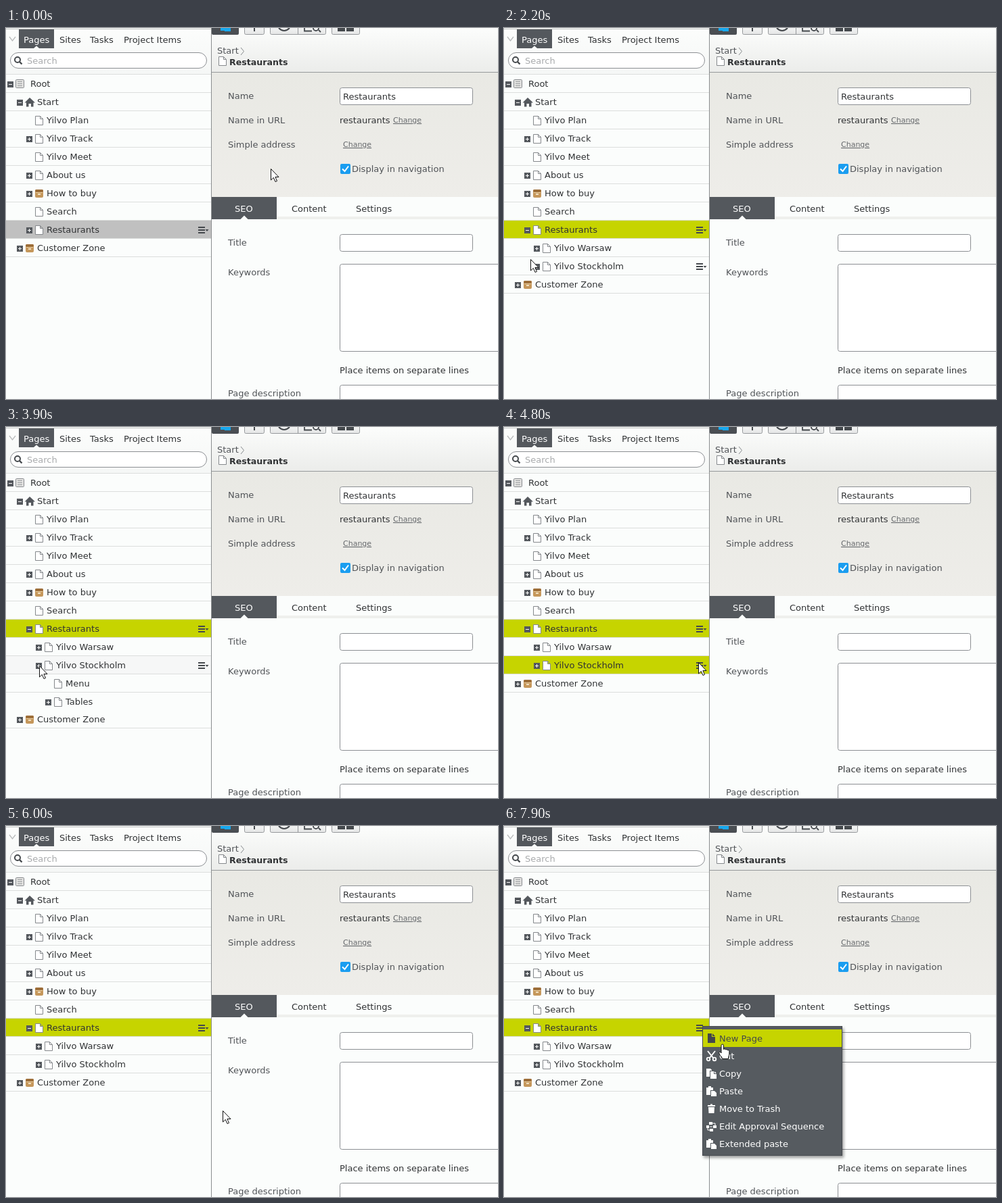
An HTML page that plays this animation: 727x549 px, repeating every 8000 ms.

```html
<!DOCTYPE html>
<html lang="en">
<head>
<meta charset="utf-8">
<title>Page tree</title>
<style>
  html, body { margin: 0; width: 100%; height: 100%; overflow: hidden; background: #fbfdfc; }
  svg { display: block; width: 100vw; height: 100vh; }
  text { font: 13px "DejaVu Sans", Verdana, sans-serif; fill: #303234; white-space: pre; }
  .label { fill: #505357; }
  .link { font-size: 11px; fill: #66696c; text-decoration: underline; }
  .bold { font-size: 12.6px; font-weight: bold; }
  .light { fill: #fff; }
  .hint { fill: #a9abad; }
  .field { fill: #fff; stroke: #8c8f93; }
  .item { color: #fff; }
  .item text { fill: currentColor; }
  .item.off { color: #7c8085; }
  .item.on { color: #43474b; }
  .item .hit { fill: none; }
  .item.on .hit { fill: #c6d400; }
</style>
</head>
<body>
<svg id="stage" viewBox="0 0 727 549" preserveAspectRatio="none"></svg>
<script>
const DARK = '#54585d', LIME = '#c6d400', PAPER = '#fbfdfc';
const ROW = 27, TREE_TOP = 69, CHILD_TOP = 312, LOOP = 8000, TICK = 100;

const rect = (x, y, w, h, fill, extra = '') =>
  `<rect x="${x}" y="${y}" width="${w}" height="${h}" fill="${fill}" ${extra}/>`;
const field = (x, y, w, h, r = 3) =>
  `<rect class="field" x="${x + .5}" y="${y + .5}" width="${w - 1}" height="${h - 1}" rx="${r}"/>`;
const text = (x, y, str, cls = '') => `<text x="${x}" y="${y}" class="${cls}">${str}</text>`;
const path = (d, fill = 'none', stroke = 'none', width = 1, extra = '') =>
  `<path d="${d}" fill="${fill}" stroke="${stroke}" stroke-width="${width}" ${extra}/>`;
const at = (x, y, body, attrs = '') => `<g transform="translate(${x} ${y})" ${attrs}>${body}</g>`;
const gradient = (id, from, to) =>
  `<linearGradient id="${id}" x2="0" y2="1"><stop stop-color="${from}"/><stop offset="1" stop-color="${to}"/></linearGradient>`;

// Tree icons, drawn in a box of about 13 by 14
const treeIcons = {
  page: path('M.5.5H7.5L11.5 4.5V13.5H.5ZM7.5.5V4.5H11.5', '#fff', '#85888c'),
  box: rect(0, 1, 12, 12, '#c5975b', 'rx="2"') + rect(0, 1, 12, 4, '#9c6d38', 'rx="2"') +
       rect(1, 5, 10, 1, '#ecd2a4') + rect(4, 7, 4, 2, '#f1dfc0'),
  home: path('M6 0L-1.5 7.5H1V13.5H4.5V9H8V13.5H11.5V7.5H14Z', DARK),
  root: rect(-.5, .5, 12, 12, '#e4e4e2', 'rx="1" stroke="#85888c"') +
        path('M2 3.5H9M2 6.5H9M2 9.5H9', 'none', '#96999c')
};
const expander = (x, y, id = '') =>
  rect(x, y, 9, 9, DARK) + path(`M${x + 2} ${y + 4.5}h5`, 'none', '#fff') +
  path(`M${x + 4.5} ${y + 2}v5`, 'none', '#fff', 1, id && `id="${id}"`);

// sign: '' none, '+' closed, '-' open, otherwise the id of a switchable plus stroke
function treeRow(y, depth, label, icon = 'page', sign = '', backId = '') {
  const x = 2 + 14 * depth;
  let out = backId ? rect(0, y, 303, ROW - 1, 'none', `id="${backId}"`) : '';
  out += rect(0, y + ROW - 1, 303, 1, '#dcdedd');
  if (sign === '-') out += rect(x, y + 10, 9, 9, DARK) + path(`M${x + 2} ${y + 14.5}h5`, 'none', '#fff');
  else if (sign) out += expander(x, y + 10, sign === '+' ? '' : sign);
  return out + at(x + 13, y + 7, treeIcons[icon]) + text(x + (depth ? 30 : 34), y + 18, label);
}
const rowMenu = (y, id) => at(284, y + 9,
  path('M0 1H10M0 5H10M0 9H10', 'none', '#45494d', 2) + path('M10.5 4H15.5L13 7Z', '#45494d'), `id="${id}"`);

const topRows = [
  [0, 'Root', 'root', '-'], [1, 'Start', 'home', '-'], [2, 'Yilvo Plan'],
  [2, 'Yilvo Track', 'page', '+'], [2, 'Yilvo Meet'], [2, 'About us', 'page', '+'],
  [2, 'How to buy', 'box', '+'], [2, 'Search'], [2, 'Restaurants', 'page', 'plusMain', 'backMain']
];
const childRows = [
  [3, 'Yilvo Warsaw', 'page', '+'], [3, 'Yilvo Stockholm', 'page', 'plusSub', 'backSub'],
  [4, 'Menu'], [4, 'Tables', 'page', '+']
];
const rows = (list, top) => list.map((r, i) => treeRow(top + i * ROW, ...r)).join('');

const leftPane =
  rect(0, 0, 303, 68, 'url(#bar)') + rect(0, 1, 303, 1, '#c3c5c4') + rect(0, 68, 303, 1, '#dcdedd') +
  path('M5 13L9.5 19L14 13', 'none', '#b9bbbc', 1.3) +
  rect(19, 2, 52, 28, DARK) + path('M41 30L45 26.5L49 30Z', PAPER) +
  text(26, 22, 'Pages', 'light') + text(79, 22, 'Sites') + text(124, 22, 'Tasks') + text(174, 22, 'Project Items') +
  field(6, 36, 291, 24, 11.5) +
  '<circle cx="17" cy="47" r="4" fill="none" stroke="#45494d" stroke-width="2"/>' +
  path('M20 50L23.5 53.5', 'none', '#45494d', 2.4) + text(31, 53, 'Search', 'hint') +
  rows(topRows, TREE_TOP) + rowMenu(285, 'menuMain') +
  `<g clip-path="url(#fold)">${rows(childRows, CHILD_TOP)}${rowMenu(312, 'menuFirst')}${rowMenu(339, 'menuSub')}</g>` +
  `<g id="below">${treeRow(CHILD_TOP, 1, 'Customer Zone', 'box', '+')}</g>`;

const button = (x, w) => rect(x + .5, -5, w - 1, 14.5, 'url(#btn)', 'rx="2" stroke="#96999c"');
const toolbar =
  rect(304, 0, 423, 66, 'url(#head)') + rect(304, 65, 423, 1, '#96999b') +
  rect(304, -4, 40, 14, '#4a4e53', 'rx="2"') + rect(317, 0, 8, 4, '#18a8ee') + rect(323, 0, 9, 5, '#18a8ee') +
  button(352, 30) + rect(366, 0, 2, 5, '#45494d') +
  button(390, 83) + rect(431, 0, 1, 10, '#96999c') +
  path('M403 0Q411 8 419 0', 'none', '#45494d', 2) +
  path('M441 0V4.5H452M462 3L465 6', 'none', '#45494d', 1.8) +
  '<circle cx="458" cy="0" r="4" fill="none" stroke="#45494d" stroke-width="1.8"/>' +
  button(481, 42) + rect(490, 0, 11, 5, '#45494d') + rect(503, 0, 11, 5, '#45494d') +
  text(312, 38, 'Start', 'label') + path('M347 29L351.5 34.5L347 40', 'none', '#85888c') +
  at(314, 42, treeIcons.page) + text(330, 55, 'Restaurants', 'bold');

const form =
  rect(304, 66, 423, 184, 'url(#form)') +
  text(328, 105, 'Name', 'label') + field(493, 88, 197, 26) + text(498, 106, 'Restaurants') +
  text(328, 141, 'Name in URL', 'label') + text(493, 141, 'restaurants') + text(572, 140, 'Change', 'link') +
  text(328, 177, 'Simple address', 'label') + text(498, 176, 'Change', 'link') +
  rect(494, 201, 15, 15, '#1a9df0', 'rx="2"') + path('M497 208.5L500.5 212L506 204.5', 'none', '#fff', 2) +
  text(511, 213, 'Display in navigation', 'label') +
  rect(304, 279, 423, 4, '#eff0ed') + rect(304, 250, 96, 33, DARK) + path('M346.5 283L352 277.5L357.5 283Z', PAPER) +
  text(338, 272, 'SEO', 'light') + text(422, 272, 'Content') + text(517, 272, 'Settings') +
  text(328, 322, 'Title', 'label') + field(493, 305, 197, 26) +
  text(328, 366, 'Keywords', 'label') + field(493, 349, 250, 130) +
  text(493, 511, 'Place items on separate lines') +
  text(328, 545, 'Page description', 'label') + field(493, 528, 250, 40);

// Context menu
const ink = 'currentColor';
const pasteIcon = path('M0 2H3V0H7V2H10V6H6V13H0Z', ink) + path('M7 7H12L15 10V15H7Z', ink);
const menuIcons = [
  path('M2 0H8V5H13V14H2ZM9 0L13 4H9Z', ink),
  path('M2 0L10 10M13 0L5 10', 'none', ink, 2) +
    '<g fill="none" stroke="currentColor" stroke-width="1.8"><circle cx="3" cy="12" r="2.3"/><circle cx="12" cy="12" r="2.3"/></g>',
  path('M0 0H6L8 2V3H5V12H0Z', ink) + path('M6 4H11V8H15V15H6ZM12 4L15 7H12Z', ink),
  pasteIcon,
  path('M2 2H6V.5H9V2H13V4H2ZM3 5H12L11.5 14H3.5Z', ink),
  path('M4 1H9V5H4ZM0 6H4V10H0ZM10 6H15V10H10ZM5 11H10V15H5Z', ink) +
    path('M9 3H13V6M5 8H9M2 10V13H5', 'none', ink),
  pasteIcon
];
const menuLabels = ['New Page', 'Cut', 'Copy', 'Paste', 'Move to Trash', 'Edit Approval Sequence', 'Extended paste'];
const menu = `<g id="popup">` +
  rect(2, 3, 207, 192, '#000', 'opacity=".38" filter="url(#soft)"') +
  rect(.5, .5, 206, 191, '#565b60', 'stroke="#484c51"') +
  menuLabels.map((label, i) => at(0, 5 + 26 * i,
    '<rect class="hit" x="1" width="205" height="26"/>' + at(6, 6, menuIcons[i]) + text(25, 18, label), 'class="item"')).join('') +
  '</g>';

const pointers =
  path('M.5.5V17L4.3 13.4L7 19.5L9.5 18.4L6.9 12.5H12Z', '#fff', '#111', 1, 'id="arrow"') +
  path('M-2 13V1.8a1.7 1.7 0 0 1 3.5 0V7.5c1-1 3-.6 3.2.6 1-.8 2.6-.4 2.8.8 1.2-.6 2.4.2 2.4 1.5V14c0 3-1.5 4-1.5 7.5H-.5' +
    'c0-3-4-5-4.8-8.7 0-2 2.1-1.8 3.3.2Z', '#fff', '#111', 1, 'id="hand"') ;

const stage = document.getElementById('stage');
stage.innerHTML = `<defs>
  ${gradient('bar', '#fcfdfc', '#f5f7f6')}${gradient('head', '#fcfdfc', '#ebecea')}
  ${gradient('form', '#e9e9e4', '#eeede9')}${gradient('btn', '#fafafa', '#e4e5e5')}
  <filter id="soft" x="-10%" y="-10%" width="120%" height="120%"><feGaussianBlur stdDeviation="2.2"/></filter>
  <clipPath id="fold"><rect id="foldBox" y="${CHILD_TOP}" width="303"/></clipPath></defs>` +
  rect(0, 0, 727, 549, PAPER) + leftPane + toolbar + form + rect(303, 0, 1, 549, '#8b8e90') +
  menu + pointers;

const part = id => document.getElementById(id);
const show = (id, on) => part(id).setAttribute('visibility', on ? 'visible' : 'hidden');
const move = (id, x, y) => part(id).setAttribute('transform', `translate(${x} ${y})`);
const items = [...document.querySelectorAll('.item')];

// Pointer hot spot: time, x, y
const route = [
  [0, 391, 208], [100, 386, 222], [300, 345, 302], [400, 318, 322], [500, 240, 309], [600, 160, 303],
  [800, 22, 300], [900, 34, 299], [1300, 34, 299], [1500, 37, 318], [1700, 37, 318],
  [2000, 29, 328], [2400, 48, 355], [2500, 48, 355], [2700, 49, 353], [4200, 49, 353],
  [4300, 80, 352], [4500, 220, 350], [4700, 287, 348], [4900, 287, 348], [5000, 290, 354],
  [5100, 290, 354], [5200, 310, 376], [5300, 327, 394], [5500, 324, 420], [5600, 324, 420],
  [5700, 326, 427], [5800, 325, 421], [5900, 325, 421], [6000, 320, 421], [6300, 320, 421],
  [6400, 318, 408], [6800, 277, 306], [7000, 293, 297], [7500, 293, 297], [7600, 299, 304],
  [7800, 299, 304], [7900, 323, 323]
];
function pointerAt(t) {
  const next = route.findIndex(k => k[0] > t);
  if (next < 0) return route.at(-1).slice(1);
  const [a, b] = [route[next - 1], route[next]], p = (t - a[0]) / (b[0] - a[0]);
  return [1, 2].map(i => Math.round(a[i] + (b[i] - a[i]) * p));
}
const within = (t, from, to) => t >= from && t < to;
const wipe = (t, start) => .5 - Math.cos(Math.PI * Math.min(1, Math.max(0, (t - start) / 350))) / 2;

function draw(t) {
  const [x, y] = pointerAt(t);
  const height = Math.round(2 * ROW * (wipe(t, 1086) + wipe(t, 2825) - wipe(t, 3870)));
  part('foldBox').setAttribute('height', height);
  move('below', 0, height);

  part('backMain').setAttribute('fill', t < 1000 ? '#c0c0c0' : LIME);
  part('backSub').setAttribute('fill',
    within(t, 4800, 6000) ? LIME : within(t, 2600, 4800) ? '#f6f7f7' : 'none');
  show('plusMain', t < 1200);
  show('plusSub', !within(t, 2900, 3900));
  show('menuFirst', within(t, 1800, 2400) && y < 339);
  show('menuSub', within(t, 2100, 6000) && y >= 339);

  const first = within(t, 4900, 6000), second = t >= 7300;
  show('popup', first || second);
  move('popup', first ? 287 : 293, first ? 348 : 296);
  const active = second ? 0 : Math.max(0, Math.floor((y - 353) / 26));
  items.forEach((item, i) => {
    const off = first && (i === 3 || i === 6);
    item.setAttribute('class', 'item' + (off ? ' off' : i === active ? ' on' : ''));
  });

  const hand = within(t, 5000, 6000) || t >= 7600;
  show('hand', hand);
  show('arrow', !hand);
  move(hand ? 'hand' : 'arrow', x, y);
}

const begin = performance.now();
function frame() {
  const t = (performance.now() - begin) % LOOP;
  draw(Math.floor(t / TICK) * TICK);
  requestAnimationFrame(frame);
}
frame();
</script>
</body>
</html>
```
